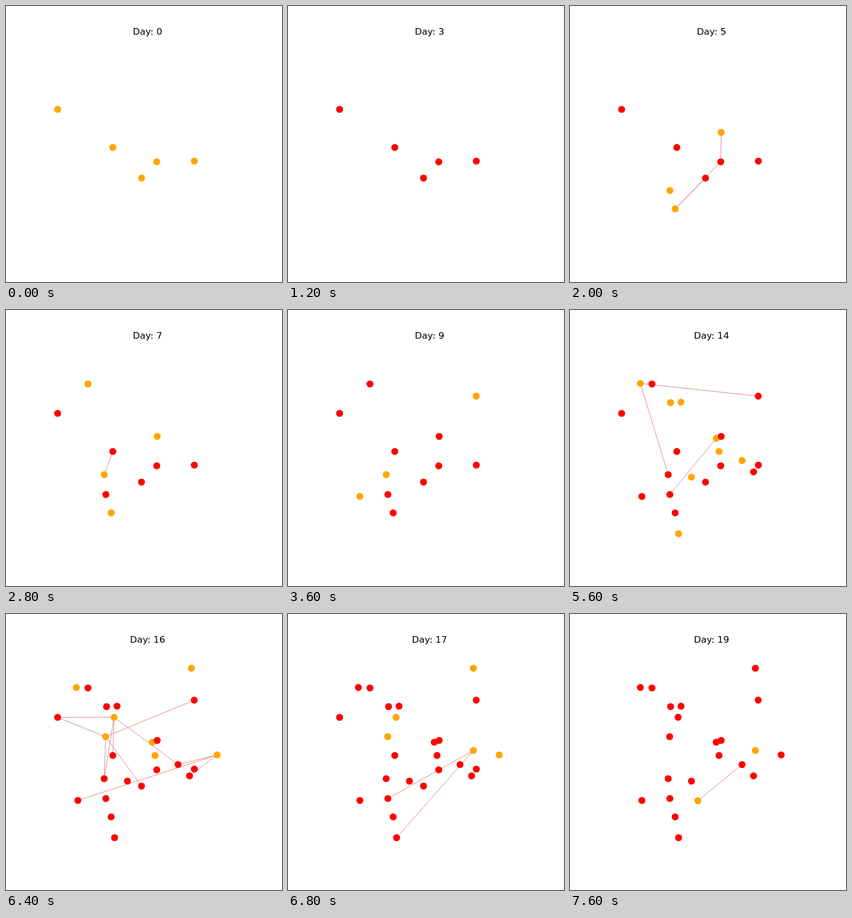
These frames come from a looping animation (500 by 500 pixels, 8000 ms). An HTML page:

```html
<!DOCTYPE html>
<html lang="en">
<head>
<meta charset="utf-8">
<style>
  html, body { margin: 0; width: 100%; height: 100%; overflow: hidden; background: #fff; }
  svg { display: block; width: 100%; height: 100%; }
  text { font: 16.67px "DejaVu Sans", sans-serif; text-anchor: middle; }
  line { stroke: #c8403c; stroke-width: .65; }
</style>
</head>
<body>
<svg viewBox="0 0 500 500">
  <text x="256.4" y="52"></text>
  <g id="links"></g>
  <g id="dots"></g>
</svg>
<script>
const DAY_MS = 400, DAYS = 20, SICK_DAYS = 16, RADIUS = 6.3;
const cases = [];

// Letters in `from` name the infecting cases by order of entry (a = first).
function add(day, wait, x, y, from = "") {
  const sources = [...from].map(c => cases[c.charCodeAt(0) - 97]);
  cases.push({ day, sick: day + wait, x: x + .5, y: y + .3, sources });
}

add(0, 3, 93, 187);
add(0, 3, 193, 256);
add(0, 3, 272.6, 282);
add(0, 3, 245, 311.5);
add(0, 3, 340.7, 280.7);
add(4, 3, 180.4, 334, "d");
add(5, 3, 190, 367.2, "cd");
add(5, 3, 273.4, 228.7, "c");
add(6, 3, 148, 133.7, "a");
add(7, 3, 177.4, 298, "b");
add(8, 4, 129.7, 337.4, "g");
add(8, 4, 340.5, 155.8, "e");
add(10, 4, 332, 293, "eg");
add(11, 4, 219.5, 302.5, "f");
add(12, 3, 181.7, 167.5, "bj");
add(12, 3, 200.6, 166.7, "gh");
add(12, 3, 311.2, 272.4, "e");
add(12, 3, 196.2, 405, "gk");
add(13, 4, 269.5, 256, "c");
add(14, 3, 127, 132.8, "jl");
add(14, 3, 264.5, 232, "fh");
add(15, 3, 335.3, 98, "l");
add(16, 3, 195.3, 186.8, "abjq");
add(16, 3, 180, 222, "adjl");
add(16, 3, 382, 255, "kmq");
add(17, 3, 335.3, 247, "fr");
add(19, 3, 231, 338, "q");

const label = document.querySelector("text");
const links = document.getElementById("links");
const dots = document.getElementById("dots");

const lineTo = (a, b) => `<line x1="${a.x}" y1="${a.y}" x2="${b.x}" y2="${b.y}"/>`;
const dot = (c, day) =>
  `<circle cx="${c.x}" cy="${c.y}" r="${RADIUS}" fill="${day < c.sick ? "orange" : "red"}"/>`;

function draw(day) {
  label.textContent = "Day: " + day;
  links.innerHTML = cases.filter(c => c.day === day)
    .flatMap(c => c.sources.map(s => lineTo(c, s))).join("");
  // Earlier cases lie on top.
  dots.innerHTML = cases.filter(c => c.day <= day && day < c.sick + SICK_DAYS)
    .reverse().map(c => dot(c, day)).join("");
}

let shown = -1;
const start = performance.now();
function tick(now) {
  const day = Math.floor(Math.max(0, now - start) / DAY_MS) % DAYS;
  if (day !== shown) draw(shown = day);
  requestAnimationFrame(tick);
}
tick(start);
</script>
</body>
</html>
```
